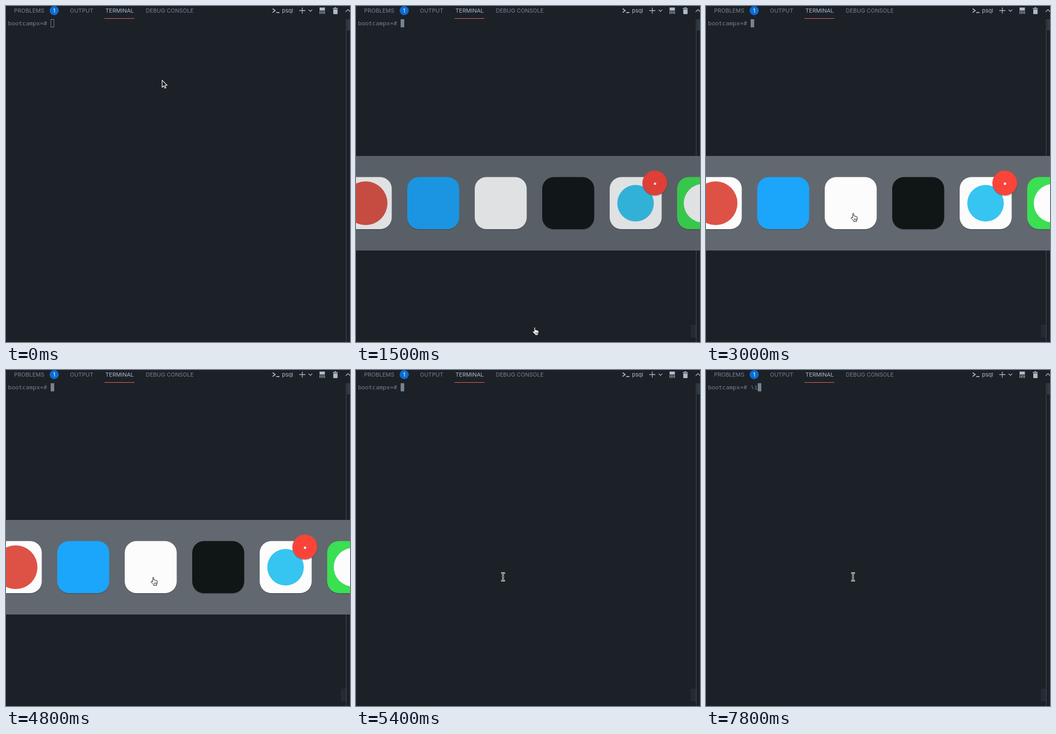
An HTML page that plays this animation: 678x661 px, repeating every 8000 ms.

```html
<!DOCTYPE html>
<html lang="en">
<head>
<meta charset="utf-8">
<title>Terminal panel</title>
<style>
  html, body { margin: 0; width: 100%; height: 100%; overflow: hidden; background: #1c2128; }
  svg { display: block; }
  .ui { font: 11px Inter, sans-serif; fill: #768390; }
  .ui .on { fill: #adbac7; }
  #prompt { font: 11.667px "Noto Sans Mono", monospace; fill: #768390; white-space: pre; }
  .icons { fill: none; stroke: #adbac7; stroke-width: 1.3; }
  .icons .solid { fill: #adbac7; stroke: none; }
</style>
</head>
<body>
<svg width="678" height="661" viewBox="0 0 678 661">
  <rect width="678" height="661" fill="#1c2128"/>

  <!-- Panel tabs -->
  <g class="ui">
    <text x="16" y="13">PROBLEMS</text>
    <circle cx="95" cy="9" r="9" fill="#0e6cd2"/>
    <text x="95" y="13" text-anchor="middle" style="fill:#fff">1</text>
    <text x="126" y="13">OUTPUT</text>
    <text x="196" y="13" class="on">TERMINAL</text>
    <text x="275.5" y="13">DEBUG CONSOLE</text>
    <text x="544" y="13" class="on">psql</text>
    <rect x="194" y="24" width="59" height="1" fill="#ec664c"/>
  </g>

  <!-- Toolbar -->
  <g class="icons">
    <path d="M525.5 5.2 530.5 9l-5 3.8M532.5 12.8h6.5" stroke-width="1.8"/>
    <path d="M578 9h12M584 3v12"/>
    <path d="M596.5 7.2 600 10.7l3.500-3.500"/>
    <path class="solid" d="M618 3h10.500v6H618z"/>
    <path d="M618.700 10v5.500m3-5.500v5.500m3-5.500v5.500m3-5.500v5.500"/>
    <path class="solid" d="M644 4h3.500V2.500h3V4h3.500v1.500h-10zM645 6.500h8.500V14.500q0 1.500-1.500 1.500h-5.500q-1.500 0-1.500-1.500z"/>
    <path d="M669.500 11.500 674 7l4.500 4.500"/>
  </g>

  <!-- Scrollbar -->
  <rect x="670" y="26" width="1" height="635" fill="#444c56"/>
  <rect x="672" y="26" width="6" height="22" fill="#323941"/>
  <rect id="corner" x="660" y="627" width="10" height="25" fill="#252b33"/>

  <text id="prompt" x="4" y="38"></text>
  <rect id="caret" y="26" width="7" height="16"/>

  <!-- App switcher -->
  <g id="switcher">
    <rect y="295" width="678" height="186" fill="#62686f"/>
    <g id="tiles"></g>
    <circle cx="589" cy="349" r="25" fill="#30343a" opacity=".35"/>
    <circle cx="589" cy="348" r="24.300" fill="#fb4439"/>
    <circle cx="589.300" cy="349.700" r="2.400" fill="#fff"/>
  </g>

  <!-- Pointers -->
  <g id="arrow">
    <path d="M.7 1.200V15L4 12l2.200 4.700 2.100-.9L6.200 11h4.300z" fill="#111" stroke="#fff" stroke-width="1.200"/>
  </g>
  <g id="hand">
    <path d="M4 10V2.300Q4 .8 5.200.8T6.400 2.300V6.200q1.800-.9 2.400.6 1.500-.7 2.200.7 2-.5 2 1.300V12q0 1.500-1.200 3v1.800H6V15.500L1.200 10.500Q.5 9 1.800 8.600 2.700 8.500 4 10z" fill="#fff" stroke="#111" stroke-width="1"/>
    <path d="M7.200 11v3.500m2-3.500v3.500m2-3.500v3.500" stroke="#111" stroke-width=".8"/>
  </g>
  <g id="beam" fill="none">
    <path d="M1 1.500h2.200Q4.800 1.500 4.800 3.200v11.600q0 1.700-1.600 1.700H1M8.600 1.500H6.400Q4.800 1.500 4.800 3.200m0 11.600q0 1.700 1.600 1.700h2.200M2.800 9h4" stroke="#fff" stroke-width="2.800"/>
    <path d="M1 1.500h2.200Q4.800 1.500 4.800 3.200v11.600q0 1.700-1.600 1.700H1M8.600 1.500H6.400Q4.800 1.500 4.800 3.200m0 11.600q0 1.700 1.600 1.700h2.200M2.800 9h4" stroke="#111"/>
  </g>
</svg>
<script>
const LOOP = 8000;
const $ = id => document.getElementById(id);
const set = (el, attrs) => { for (const k in attrs) el.setAttribute(k, attrs[k]); };

// x, tile colour, optional disc colour and radius
const tiles = [
  [-32, '#fcfcfc', '#de5246', 43],
  [101, '#1ba5fb'],
  [234, '#fcfcfc'],
  [367, '#101616'],
  [500, '#fcfcfc', '#36c5f0', 36],
  [633, '#3bdf52', '#fcfcfc', 38],
];
const tile = (x, y, fill, opacity = 1) =>
  `<rect x="${x}" y="${y}" width="102.500" height="102.500" rx="23" fill="${fill}" opacity="${opacity}"/>`;
$('tiles').innerHTML = tiles.map(([x, fill, disc, r]) =>
  tile(x, 338, '#30343a', .4) + tile(x, 336.5, fill) +
  (disc ? `<circle cx="${x + 51}" cy="388" r="${r}" fill="${disc}"/>` : '')).join('');

// Each step holds until the next: time, then values
const pointer = [
  [0, 'arrow', 307, 145], [150, 'arrow', 292, 205], [300, 'arrow', 364, 614],
  [450, 'arrow', 368, 633], [600, 'arrow', 367, 641], [750, ''],
  [1500, 'hand', 347, 631], [1650, 'beam', 318, 482], [1800, 'beam', 313, 469],
  [1950, 'beam', 307, 451], [2100, 'beam', 285, 398],
  [3000, 'hand', 285, 407], [5400, 'beam', 285, 398],
];
const switcher = [[0, 0], [1500, .88], [1650, 0], [3000, 1], [5250, .6], [5400, 0]];
const typed = [[0, ''], [7200, '\\'], [7800, '\\i']];
const at = (steps, t) => steps.findLast(s => s[0] <= t).slice(1);

function draw(now) {
  const t = now % LOOP;
  const [kind, x, y] = at(pointer, t);
  for (const id of ['arrow', 'hand', 'beam'])
    set($(id), { visibility: id === kind ? 'visible' : 'hidden' });
  if (kind) set($(kind), { transform: `translate(${x} ${y})` });

  set($('switcher'), { opacity: at(switcher, t)[0] });

  const [input] = at(typed, t);
  const focused = t >= 1500;
  const left = 88 + 7 * input.length;
  $('prompt').textContent = 'bootcampx=# ' + input;
  set($('caret'), focused
    ? { x: left, y: 26, width: 7, height: 16, fill: '#768390', stroke: 'none' }
    : { x: left + .5, y: 26.5, width: 6, height: 15, fill: 'none', stroke: '#768390' });
  set($('corner'), { opacity: +focused });
  requestAnimationFrame(draw);
}
requestAnimationFrame(draw);
</script>
</body>
</html>
```
